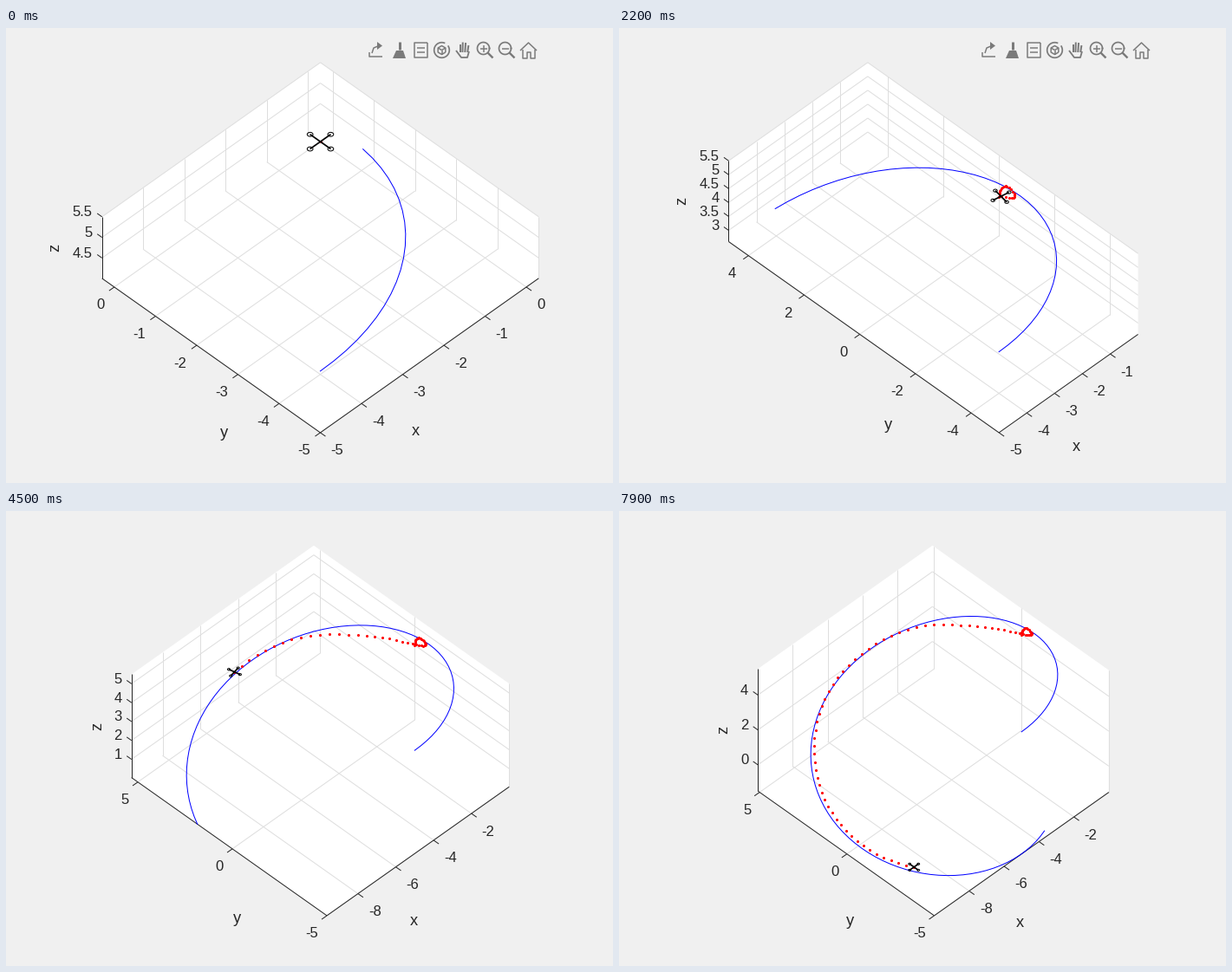
Write a matplotlib script that moves like this. It is 700 px wide and 525 px high and loops after 8000 ms.

```python
import numpy as np
import matplotlib.pyplot as plt
from matplotlib.animation import FuncAnimation
from matplotlib.collections import LineCollection
from matplotlib.patches import Polygon

W, H = 700, 525
N, STEP, AHEAD = 80, 1 / 15, 20
PX = 0.72  # points per pixel at 100 dpi
TOP, BOTTOM, MID = 39.8, 466.9, 362.5
R2 = np.sqrt(0.5)
ARM = 0.25
DARK, GREY = "#262626", "#7a7a7a"

# tracking error on the view plane: step, right, up
ERROR = np.array([
    (0, -.32, 5.33), (4, -1.34, 4.47), (9, -1.79, 3.21), (15, -1.23, 1.22),
    (19, -.58, .14), (23, .02, -.48), (29, .42, -.60), (38, .19, .04),
    (47, .06, .21), (63, .23, .02), (79, 0, .26)])


def smooth(keys, t):
    """Cubic Hermite curve through the keyed values."""
    ks, vals = keys[:, 0], keys[:, 1:]
    slope = np.gradient(vals, ks, axis=0)
    i = np.clip(np.searchsorted(ks, t, side="right") - 1, 0, len(ks) - 2)
    h = (ks[i + 1] - ks[i])[:, None]
    s = (t - ks[i])[:, None] / h
    return ((1 + 2 * s) * (1 - s) ** 2 * vals[i] + s * (1 - s) ** 2 * h * slope[i]
            + s * s * (3 - 2 * s) * vals[i + 1] + s * s * (s - 1) * h * slope[i + 1])


def reference(k):
    a = np.asarray(k) * STEP
    return -5 + 5 * np.sin(a), -5 * np.cos(a), 2 + 3.5 * np.cos(a / 2)


def view(x, y, z):
    return np.array([x - y, (x + y) * R2 + z])


steps = np.arange(N)
trail = view(*reference(steps + 1)).T + smooth(ERROR, steps)


def arm_pair(k):
    yaw = -.25 * np.sin(np.pi * k / 29) * np.exp(-(k / 60) ** 6)
    c, s = ARM * np.cos(yaw), ARM * np.sin(yaw)
    return view(c, s, 0), view(-s, c, 0)


def limits(k):
    x, y, z = reference(np.arange(k + AHEAD + 1))
    x1, y1 = x.max(), y.max()
    if k < 20:  # take-off, rotors stick out past the curve
        dx = -.25 * (k / 15) ** 2
        x1 = max(x1, dx + .3)
        y1 = max(y1, dx - trail[k, 0] + .3)
    elif k > 33:  # wide turn
        dy = -5.1 * np.cos(np.arange(34, k + 2) * STEP)
        y1 = max(y1, dy.max(), dy[-1] + ARM)
    return (x.min(), x1), (-5, y1), (min(4.005, z.min()), 5.5)


def ticks(lim, step):
    first, last = np.ceil(lim[0] / step - 1e-6), np.floor(lim[1] / step + 1e-6)
    return np.arange(first, last + 1) * step + 0.0


def tick_steps(*lims):
    rx, ry, rz = (b - a for a, b in lims)
    sx = 1 if rx < 7 else 2
    sy = 1 if ry < 9 else 2 if ry < 10.01 else 5
    sz = .5 if rz < 3 else 2 if rz < 4.2 else 1 if rz < 6 else 2
    return sx, sy, sz


fig = plt.figure(figsize=(W / 100, H / 100), dpi=100, facecolor="#f0f0f0")
ax = fig.add_axes([0, 0, 1, 1])


def lines(segs, color, width, z):
    ax.add_collection(LineCollection(segs, colors=color, linewidths=width * PX, zorder=z))


def text(x, y, s, ha="center", size=16.67, rot=0):
    ax.text(x, y, s, ha=ha, va="center" if rot else "center_baseline",
            rotation=rot, color=DARK, fontsize=size * PX, family="Liberation Sans")


def stroke(*pts, width=1.5):
    ax.plot(*zip(*pts), color=GREY, lw=width * PX, solid_capstyle="butt")


def ring(x, y, r, a0=0, a1=360):
    a = np.radians(np.linspace(a0, a1, 40))
    ax.plot(x + r * np.cos(a), y + r * np.sin(a), color=GREY, lw=1.7 * PX)


def fill(*pts):
    ax.add_patch(Polygon(pts, fc=GREY, ec="none", zorder=3))


def toolbar():
    # export
    stroke((419, 28), (419, 33), (434, 33))
    stroke((422, 29), (424, 23), (430, 20.5))
    fill((428, 16), (434, 20.5), (428, 25))
    # brush
    stroke((454, 16), (454, 25), width=3)
    fill((450, 26), (458, 26), (461, 35), (446, 35))
    # data tip
    stroke((486, 17), (471, 17), (471, 34), (486, 34), (486, 17))
    for y in (23, 28):
        stroke((474, y), (483, y))
    # rotate: a cube in an open circle
    ring(502.5, 25.5, 8.8, -30, 290)
    a = np.radians(np.arange(30, 391, 60))
    cube = list(zip(502.5 + 5 * np.cos(a), 25.5 + 5 * np.sin(a)))
    stroke(*cube)
    for corner in cube[1:6:2]:
        stroke((502.5, 25.5), corner)
    # hand
    for i, top in enumerate((19, 16.5, 17, 20)):
        x = 523.5 + 3.3 * i
        stroke((x, top), (523.5 + 2.9 * i, 28), width=2)
    stroke((519, 26), (525, 34), (532, 34), (534, 27), width=1.8)
    # zoom in, zoom out
    for x in (550.5, 575.5):
        ring(x, 23.5, 7)
        stroke((x + 5, 28.5), (x + 11, 34.5), width=2.4)
        stroke((x - 4, 23.5), (x + 4, 23.5))
    stroke((550.5, 19.5), (550.5, 27.5))
    # home
    stroke((593, 26), (602.5, 17), (612, 26))
    stroke((595.5, 25), (595.5, 34.5), (600.5, 34.5), (600.5, 28), (604.5, 28),
           (604.5, 34.5), (609.5, 34.5), (609.5, 25))


def draw(k):
    ax.cla()
    ax.set(xlim=(0, W), ylim=(H, 0))
    ax.axis("off")

    (x0, x1), (y0, y1), (z0, z1) = lims = limits(k)
    lx, ly, lz = x1 - x0, y1 - y0, z1 - z0
    unit = (BOTTOM - TOP) / ((lx + ly) * R2 + lz)
    cx = MID + (ly - lx) / 2 * unit
    u0, w0 = view(x0, y0, z0)

    def flat(u, w):
        return cx + unit * (u - u0), BOTTOM - unit * (w - w0)

    def proj(x, y, z):
        return flat(*view(x, y, z))

    # walls, floor and grid
    front, right, left = proj(x0, y0, z0), proj(x1, y0, z0), proj(x0, y1, z0)
    rise = lz * unit
    peak = (left[0], left[1] - rise)
    ax.add_patch(Polygon([front, right, (right[0], right[1] - rise), proj(x1, y1, z1),
                          peak, left], fc="white", ec="none", zorder=0))
    sx, sy, sz = tick_steps(*lims)
    tx, ty, tz = ticks(lims[0], sx), ticks(lims[1], sy), ticks(lims[2], sz)
    paths = [[(x, y0, z0), (x, y1, z0), (x, y1, z1)] for x in tx]
    paths += [[(x0, y, z0), (x1, y, z0), (x1, y, z1)] for y in ty]
    paths += [[(x0, y1, z), (x1, y1, z), (x1, y0, z)] for z in tz]
    lines([[proj(*a), proj(*b)] for p in paths for a, b in zip(p, p[1:])], "#dedede", 1, 1)

    # axes, ticks and labels
    wx, wy = right[0] - front[0], front[0] - left[0]
    marks = [[peak, left], [left, front], [front, right]]
    for v in tx:
        px, py = proj(v, y0, z0)
        marks.append([(px, py), (px + 6, py + 4.2)])
        text(px + 12, py + 19.5, f"{v:g}", "left")
    for v in ty:
        px, py = proj(x0, v, z0)
        marks.append([(px, py), (px - 6, py + 4.2)])
        text(px - 9.5 - (wy - 210) * .045, py + 19.5, f"{v:g}", "right")
    for v in tz:
        px, py = proj(x0, y1, v)
        marks.append([(px, py), (px - 5.5, py - 3.9)])
        text(px - 11, py - 6.5, f"{v:g}", "right")
    lines(marks, DARK, 1, 2)

    text((front[0] + right[0]) / 2 + 8 - (wx - 163) * .267,
         (front[1] + right[1]) / 2 + 72 + (wx - 163) * .155, "x", size=18.3)
    text((front[0] + left[0]) / 2 + 4.5 + (wy - 204) * .222,
         (front[1] + left[1]) / 2 + 77 + (wy - 204) * .215, "y", size=18.3)
    text(left[0] - (54 if sz < 1 else 39), left[1] - rise / 2, "z", size=18.3, rot=90)

    # planned curve and flown trail
    ax.plot(*proj(*reference(np.arange(k + AHEAD + 1))), color="blue", lw=PX, zorder=4)
    ax.plot(*flat(*trail[:k + 1].T), "o", color="red", ms=3.1 * PX, mew=0, zorder=5)

    # drone
    pos, (a, b) = trail[k], arm_pair(k)
    lines([[flat(*(pos - v)), flat(*(pos + v))] for v in (a, b)], "black", 1.7, 6)
    t = np.linspace(0, 2 * np.pi, 25)[:, None]
    disc = .2 * (np.cos(t) * a + np.sin(t) * b)
    lines([np.column_stack(flat(*(pos + v + disc).T)) for v in (a, b, -a, -b)], "black", 1, 6)

    if k < 5 or 17 <= k < 23:
        toolbar()
    return []


anim = FuncAnimation(fig, draw, frames=N, interval=100, init_func=lambda: [],
                     repeat=True, repeat_delay=0, blit=False)
plt.show()
```
